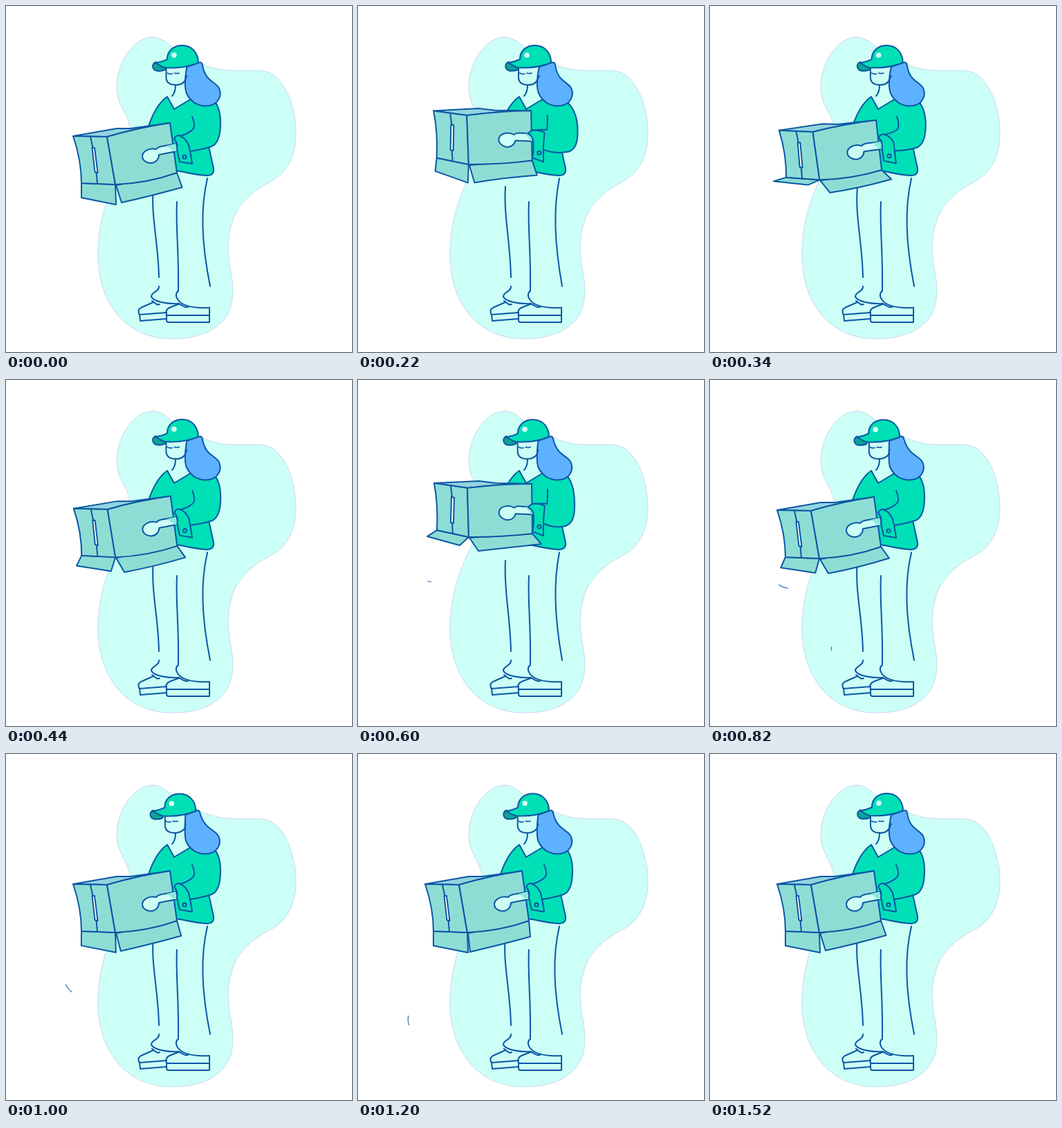
An HTML page with a canvas for the animation above (1540 ms loop, 500 by 500 pixels).

```html
<!DOCTYPE html>
<html>
<head>
<meta charset="utf-8">
<style>
html, body { margin: 0; width: 100%; height: 100%; overflow: hidden; background: #fff; }
canvas { display: block; width: 500px; height: 500px; }
</style>
</head>
<body>
<canvas id="stage" width="500" height="500"></canvas>
<script>
const ctx = document.getElementById('stage').getContext('2d');
const LOOP = 1540;
const INK = '#0b57a4', PALE = '#ccfff6', GREEN = '#00dfb6', SHADE = '#0aa594',
      CARD = '#8eddd5', HAIR = '#5eb1ff';

const lerp = (a, b, u) => a + (b - a) * u;
const ease = u => (1 - Math.cos(Math.PI * u)) / 2;

// Eased value at time t along [time, value] pairs
function track(keys, t) {
  for (let i = 1; i < keys.length; i++) {
    const [t0, v0] = keys[i - 1], [t1, v1] = keys[i];
    if (t <= t1) return lerp(v0, v1, ease((t - t0) / (t1 - t0)));
  }
  return keys[keys.length - 1][1];
}

function shape(d, fill, stroke = INK, width = 2) {
  const path = new Path2D(d);
  if (fill) { ctx.fillStyle = fill; ctx.fill(path); }
  if (stroke) { ctx.strokeStyle = stroke; ctx.lineWidth = width; ctx.stroke(path); }
}
const line = (d, width = 2) => shape(d, null, INK, width);

function circle(x, y, r, fill, stroke) {
  shape(`M${x - r} ${y}a${r} ${r} 0 1 0 ${2 * r} 0a${r} ${r} 0 1 0 ${-2 * r} 0Z`, fill, stroke);
}

const LIFT = [[0, 0], [185, 1], [410, 0], [606, 1], [810, 0], [LOOP, 0]];
const ELBOW = [[0, 310], [185, 318], [410, 310], [606, 313], [810, 310], [LOOP, 310]];
const LEFT_FLAP = [[0, 0], [150, 0], [220, .15], [330, 1.3], [440, .52], [500, .5], [600, 1],
  [700, 1.1], [820, .48], [1020, 0], [LOOP, 0]];
const RIGHT_FLAP = [[0, .5], [220, .45], [330, 1.1], [440, .9], [600, 1], [700, 1.1], [820, .9],
  [1150, 0], [1220, 0], [1500, .5], [LOOP, .5]];
const NOD = [[-460, -5], [220, 0], [900, -5], [1580, 0]];

function drawBlob() {
  shape(`M212 45C228 45 235 57 248 64C268 76 285 87 311 92C334 95 350 92 371 94
    C402 97 419 145 419 184C419 217 406 241 384 253C359 266 337 283 328 309
    C315 345 324 372 327 398C334 450 303 481 240 481C170 481 133 425 133 361
    C133 314 144 280 162 244C177 214 185 189 176 164C169 147 159 136 160 114
    C161 82 184 45 212 45Z`, PALE, '#c5c3f5', .7);
}

function drawLegs(p) {
  const k = 1.5 * p;
  line(`M213 261C${209 + k} 304 220 340 221 392`);
  line('M247 283C245 320 250 350 249 411');
  line(`M291 249C${281 + k} 292 ${282 + k} 340 295 405`);
  line('M221 405C222 413 210 413 210 420C213 427 232 431 250 430');
  line('M249 412C245 414 245 420 248 424C255 434 274 437 294 436');
  line('M211 426C216 429 217 433 222 431M213 428L195 436C190 439 191 443 193 446L232 443');
  line('M193 446L194 455L232 452');
  line('M248 430C255 431 257 437 263 435M249 431L236 436C230 439 231 444 232 447H294');
  line('M294 436V457H235Q232 457 232 454V445');
}

function drawShirt(p, ex) {
  shape('M204 180C210 160 220 140 233 131L243 149L268 134L300 138L293 203L300 235Q301 245 290 245C272 244 260 240 246 238L236 205Z', GREEN);
  const ey = 169 + 12 * p, by = 204 + 8 * p;
  const arm = `M299 135C307 143 ${ex} 154 ${ex} ${ey}C${ex} ${ey + 17} ${ex - 3} ${by - 5} ${ex - 13} ${by - 1}`;
  const under = `Q284 ${lerp(207, 215, p)} 267 ${lerp(210, 207, p)}`;
  shape(arm + under + 'L258 185L270 140Z', GREEN, null);
  line(arm + under);
  line(`M${269 + 5 * p} ${160 - 2 * p}Q${275 - p} 175 ${lerp(269, 273, p)} 179Q${lerp(262, 268, p)} ${lerp(186, 178, p)} 246 ${lerp(189, 179, p)}`);
}

function drawHead(nod) {
  const f = nod * .45, h = nod * .2;
  line('M245 114C245 122 243 127 240 130');
  shape(`M${232 + f} 85V103C${232 + f} 111 ${238 + f} 114 ${246 + f} 114C${256 + f} 114 260 108 261 101L262 86Z`, PALE);
  line(`M${234 + nod * .6} 97q3 2 7 1m3-1q3 1 7 0`, 1.7);
  shape(`M${262 + nod * .6} 88C259 101 257 115 ${261 + h} 126C${268 + h} 141 ${281 + h} 146 ${294 + h} 144
    C${306 + h} 142 ${312 + h} 131 ${309 + h} 121C${306 + h} 109 ${288 + h} 111 ${285 + nod} 85
    Q${284 + nod} 80 ${279 + nod} 82Z`, HAIR);
  line(`M${262 + nod * .5} 101Q${260 + nod * .3} 103 259 108`);

  ctx.save();
  ctx.translate(nod, -nod * .1);
  shape('M217 81C212 84 212 90 217 93Q224 95 231 92L232 88Z', SHADE);
  shape('M234 77C234 64 244 57 256 57C269 57 279 67 279 82C264 88 246 90 231 89C225 88 221 83 216 82Q226 81 234 77Z', GREEN);
  circle(244, 71, 3.8, '#d5fff6', null);
  ctx.restore();
}

// Resting and raised position of each box corner
const CORNERS = {
  tl: [97, 188, 110, 149], tm: [146, 189, 158, 156], tr: [237, 169, 251, 150],
  bl: [109, 256, 114, 217], bm: [158, 258, 160, 227], br: [247, 241, 252, 222],
  backL: [160, 177, 175, 146], backR: [180, 177, 199, 149],
  bow: [109, 223, 116, 180], lid: [190, 176, 206, 150], sag: [205, 256, 210, 227],
  s1: [124.5, 205, 135, 169], s2: [128, 205, 139, 170], s3: [132.5, 241, 138, 207], s4: [128.5, 240, 134, 206],
  creaseTop: [122, 189, 134, 153], creaseEnd: [132, 257, 137, 222]
};

function drawBox(p, left, right) {
  const at = (name, dx = 0, dy = 0) => {
    const [x0, y0, x1, y1] = CORNERS[name];
    return `${lerp(x0, x1, p)} ${lerp(y0, y1, p)}`.split(' ').map((v, i) => +v + (i ? dy : dx)).join(' ');
  };
  const sq = right * right;
  shape(`M${at('bl')}L${at('bl', -14 * left, 21 - 12 * left)}L${at('bm', 1 - 14 * left, 29 - 17 * left)}L${at('bm')}Z`, CARD);
  shape(`M${at('bm', 1, 1)}L${at('bm', 4 + 10 * right, 28 - 8 * sq)}
    Q${at('sag', 8 * right, 20 - 5 * sq)} ${at('br', 2 + 11 * right, 23 - 8 * sq)}L${at('br')}Z`, CARD);
  shape(`M${at('tl')}L${at('backL')}L${at('backR')}L${at('tr')}Q${at('lid')} ${at('tm')}Z`, '#93d4e0');
  shape(`M${at('tl')}L${at('tm')}L${at('bm')}L${at('bl')}Q${at('bow')} ${at('tl')}Z`, CARD);
  shape(`M${at('tm')}Q${at('lid')} ${at('tr')}L${at('br')}Q${at('sag')} ${at('bm')}Z`, CARD);
  line(`M${at('creaseTop')}L${at('s1', 1)}M${at('s4', 2)}L${at('creaseEnd')}`);
  shape(`M${at('s1')}L${at('s2')}L${at('s3')}L${at('s4')}Z`, '#fff');
}

function drawHand(p) {
  const m = (x0, y0, x1, y1) => `${lerp(x0, x1, p)} ${lerp(y0, y1, p)}`;
  ctx.save();
  ctx.translate(208 + 7 * p, 216 - 25 * p);
  ctx.rotate(.25 * p);
  shape('M38-17L16-13Q11-12 9-9C-2-12-11-5-11 1C-11 8-4 11 2 11C9 10 13 5 13-1L38-6Z', PALE);
  shape('M24-14L37-17L40-6L35-6Z', '#8debdc', null);
  ctx.restore();
  shape(`M${m(243, 192, 246, 184)}Q${m(245, 187, 248, 180)} ${m(250, 187, 254, 179)}
    Q${m(259, 190, 263, 178)} ${m(264, 201, 270, 182)}Q${m(267, 213, 267, 204)} ${m(269, 228, 268, 225)}
    L${m(251, 225, 252, 219)}Q${m(249, 217, 254, 212)} ${m(247, 207, 254, 200)}
    Q${m(249, 199, 254, 187)} ${m(243, 192, 246, 184)}Z`, GREEN);
  circle(lerp(258, 262, p), lerp(218, 212, p), 2.6, null, INK);
}

function stroke(x, y, angle, length) {
  ctx.save();
  ctx.translate(x, y);
  ctx.rotate(angle);
  line(`M${-length / 2} 0Q0 ${length * .12} ${length / 2} 0`, 1);
  ctx.restore();
}

// Thin slips drifting down from the open box
function drawSlips(t) {
  if (t > 580 && t < 1340) {
    stroke(track([[580, 103], [820, 106], [1200, 73], [1340, 38]], t),
      track([[580, 291], [820, 298.5], [1200, 385], [1340, 397]], t),
      track([[580, .2], [820, .38], [1200, 1.5], [1340, 2.6]], t),
      track([[580, 5], [820, 14], [1340, 13]], t));
  }
  if (t > 780 && t < 860) stroke(175.5, 388 + (t - 820) * .1, 1.7, 5);
}

function draw(t) {
  const p = track(LIFT, t);
  ctx.fillStyle = '#fff';
  ctx.fillRect(0, 0, 500, 500);
  ctx.lineCap = ctx.lineJoin = 'round';
  drawBlob();
  drawLegs(p);
  drawShirt(p, track(ELBOW, t));
  drawHead(track(NOD, t));
  drawBox(p, track(LEFT_FLAP, t), track(RIGHT_FLAP, t));
  drawHand(p);
  drawSlips(t);
}

const start = performance.now();
function tick() {
  draw((performance.now() - start) % LOOP);
  requestAnimationFrame(tick);
}
tick();
</script>
</body>
</html>
```
